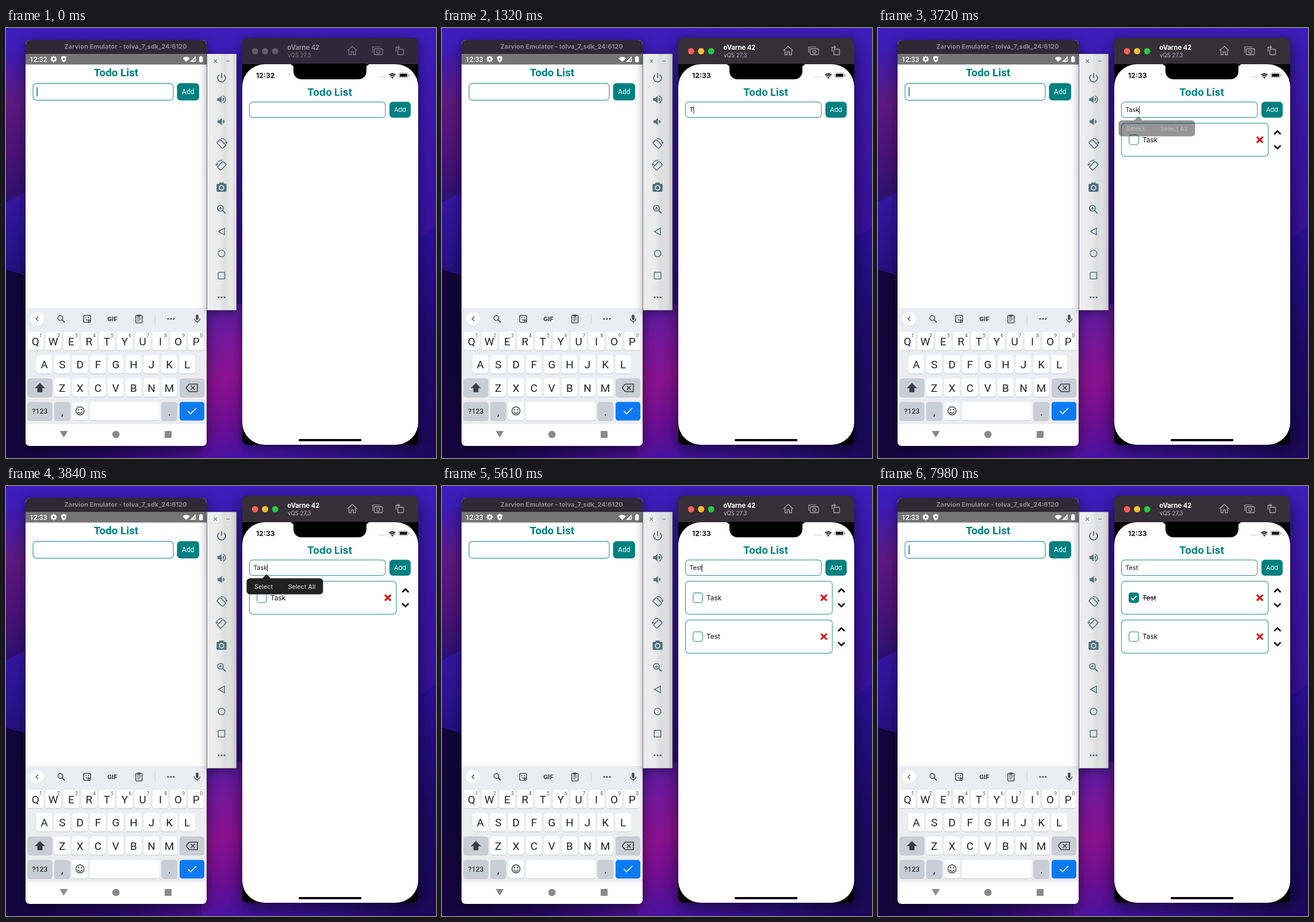
An HTML page with a canvas for the animation above (8000 ms loop, 748 by 748 pixels).

```html
<!DOCTYPE html>
<html lang="en">
<head>
<meta charset="utf-8">
<title>Todo list on two devices</title>
<style>
html, body { margin: 0; width: 100%; height: 100%; overflow: hidden; background: #2a0f80; }
canvas { display: block; width: 748px; height: 748px; }
</style>
</head>
<body>
<canvas id="stage" width="748" height="748"></canvas>
<script>
const ctx = document.getElementById('stage').getContext('2d');
const LOOP = 8000;
const TEAL = '#008080', SLATE = '#4f7480', KEY_INK = '#202124', ICON = '#4a4d51', MODIFIER = '#c9ced6';
const ROBOTO = 'Roboto, sans-serif', INTER = 'Inter, sans-serif';

// times at which the left caret flips, starting visible
const BLINKS = [180, 660, 1080, 1560, 2010, 2460, 2910, 3360, 3810, 4290,
  4710, 5160, 5610, 6090, 6540, 6990, 7440, 7890];
const TYPED = [[0, ''], [1320, 'T'], [1440, 'Ta'], [1560, 'Tas'], [1650, 'Task'],
  [3870, 'Tas'], [3930, 'Ta'], [4020, 'T'], [4170, 'Te'], [4290, 'Tes'], [4440, 'Test']];
const PRESSES = [2430, 4920];
const FOCUS = 690, SWAP = 6150, CHECK = 7350;

const clamp = v => Math.max(0, Math.min(1, v));
const ramp = (t, a, b) => clamp((t - a) / (b - a));

function box(x, y, w, h, r, fill, stroke, lw = 1) {
  ctx.beginPath();
  ctx.roundRect(x, y, w, h, r);
  if (fill) { ctx.fillStyle = fill; ctx.fill(); }
  if (stroke) { ctx.strokeStyle = stroke; ctx.lineWidth = lw; ctx.stroke(); }
}

function trace(p) {
  ctx.beginPath();
  for (let i = 0; i < p.length; i += 2) ctx.lineTo(p[i], p[i + 1]);
}

function line(p, color, lw = 1.5, closed = false) {
  trace(p);
  if (closed) ctx.closePath();
  ctx.strokeStyle = color;
  ctx.lineWidth = lw;
  ctx.stroke();
}

function poly(p, fill) {
  trace(p);
  ctx.fillStyle = fill;
  ctx.fill();
}

function dot(x, y, r, fill) {
  ctx.beginPath();
  ctx.arc(x, y, r, 0, 7);
  ctx.fillStyle = fill;
  ctx.fill();
}

function arc(x, y, r, color, lw = 1.5, a = 0, b = Math.PI * 2) {
  ctx.beginPath();
  ctx.arc(x, y, r, a, b);
  ctx.strokeStyle = color;
  ctx.lineWidth = lw;
  ctx.stroke();
}

function text(s, x, y, font, color, align = 'left') {
  ctx.font = font;
  ctx.fillStyle = color;
  ctx.textAlign = align;
  ctx.fillText(s, x, y);
}

function at(x, y, draw, angle = 0) {
  ctx.save();
  ctx.translate(x, y);
  ctx.rotate(angle);
  draw();
  ctx.restore();
}

function shade(x0, y0, x1, y1, ...colors) {
  const g = ctx.createLinearGradient(x0, y0, x1, y1);
  colors.forEach((c, i) => g.addColorStop(i / (colors.length - 1), c));
  return g;
}

function shadowBox(x, y, w, h, r, fill, blur, alpha) {
  ctx.save();
  ctx.shadowColor = `rgba(0,0,0,${alpha})`;
  ctx.shadowBlur = blur;
  ctx.shadowOffsetY = blur / 4;
  box(x, y, w, h, r, fill);
  ctx.restore();
}

function wallpaper() {
  box(0, 0, 748, 748, 0, shade(0, 0, 0, 748, '#3d1dbc', '#3a15a6', '#36109a', '#2c0c82', '#2b0c78'));
  poly([0, 45, 90, 20, 90, 270, 0, 305], shade(0, 40, 0, 300, '#3d1bb2', '#5c187f', '#4c1278', '#2c1070'));
  poly([0, 303, 120, 240, 120, 450, 0, 420], shade(0, 270, 0, 420, '#3717a8', '#241080'));
  poly([0, 420, 110, 452, 360, 600, 360, 748, 0, 748], shade(0, 700, 360, 748, '#12053a', '#220860', '#4c1092'));
  poly([748, 345, 690, 385, 690, 748, 748, 748], shade(0, 350, 0, 748, '#2b0f98', '#1b0a68', '#1a0858'));
  box(340, 480, 80, 268, 0, shade(340, 480, 410, 748, '#4e1ba0', '#74179a', '#8a1190', '#6c0e92', '#4512a2'));
  box(411, 720, 337, 28, 0, shade(411, 0, 748, 0, '#4512a2', '#2f1084', '#1a0858'));
}

function wifi(x, y, r, color, bands) {
  const a = -Math.PI * .75, b = -Math.PI * .25;
  if (bands) {
    arc(x, y, r - 1, color, 1.9, a, b);
    arc(x, y, r - 4, color, 1.8, a, b);
    dot(x, y - 1, 1.4, color);
  } else {
    ctx.beginPath();
    ctx.moveTo(x, y);
    ctx.arc(x, y, r, a, b);
    ctx.fillStyle = color;
    ctx.fill();
  }
}

function leftStatus(clock) {
  box(34, 45, 315, 18.5, 0, '#757575');
  text(clock, 41, 59, '500 12px ' + ROBOTO, '#fff');
  at(83, 54, () => {
    for (let i = 0; i < 8; i++) {
      ctx.rotate(Math.PI / 4);
      box(-1.2, -5.4, 2.4, 3, .5, '#fff');
    }
    arc(0, 0, 2.9, '#fff', 2);
  });
  poly([100.5, 48.5, 105, 50.3, 105, 54, 103.5, 57.5, 100.5, 60, 97.5, 57.5, 96, 54, 96, 50.3], '#fff');
  poly([99.3, 51.8, 103, 54, 99.3, 56.2], '#757575');
  wifi(313.5, 59, 9, '#fff');
  poly([320, 59, 330, 59, 330, 49], '#fff');
  poly([326.5, 54.5, 328.6, 52.4, 328.6, 57.6, 326.5, 57.6], '#8d8d8d');
  box(336, 50, 6.5, 9.5, 1, '#fff');
  box(337.7, 48.8, 3, 2, 0, '#fff');
}

function key(x, y, w, label, fill = '#fff') {
  box(x, y + 1, w, 32, 4.5, 'rgba(60,66,75,.24)');
  box(x, y, w, 32, 4.5, fill);
  if (label) text(label, x + w / 2, y + 23, '19px ' + ROBOTO, KEY_INK, 'center');
}

function keyTools() {
  const y = 506;
  dot(54, 506.5, 12, '#d9dce0');
  dot(54, 505.7, 12, '#fff');
  line([56, 502, 52.2, 505.7, 56, 509.5], ICON, 1.5);
  arc(94.5, 504.5, 4.2, ICON, 1.6);
  line([97.6, 507.6, 102.3, 512.2], ICON, 1.9);
  box(135, 500, 12, 12, 2, null, ICON, 1.5);
  poly([142.5, 512.6, 147.6, 507.5, 142.5, 507.5], ICON);
  dot(138.7, 503.8, 1, ICON);
  dot(143.3, 503.8, 1, ICON);
  arc(141, 505.3, 2.8, ICON, 1.2, .3, 2.6);
  text('GIF', 185, 510, '900 11.5px ' + ROBOTO, ICON, 'center');
  box(225.7, 500, 11, 13, 1, null, ICON, 1.5);
  box(228.3, 498.5, 5.8, 4, 1, ICON);
  for (const d of [0, 2.6, 5.2]) line([228, 504.4 + d, d > 5 ? 232 : 234.5, 504.4 + d], ICON, 1.1);
  line([259.5, 497, 259.5, 515], '#d0d3d7', 1);
  for (const d of [-5, 0, 5]) dot(287 + d, y, 1.6, ICON);
  box(330.2, 498.5, 4.6, 9.5, 2.3, ICON);
  arc(332.5, 505.5, 4.9, ICON, 1.4, 0, Math.PI);
  line([332.5, 510, 332.5, 513.5], ICON, 1.5);
}

function keyboard() {
  box(34, 487, 315, 202, 0, '#ebedf0');
  keyTools();
  [...'QWERTYUIOP'].forEach((c, i) => {
    const x = 37.5 + i * 31.05;
    key(x, 528.5, 27.5, c);
    text((i + 1) % 10, x + 23, 537.5, '8.5px ' + ROBOTO, '#55585c', 'center');
  });
  [...'ASDFGHJKL'].forEach((c, i) => key(53 + i * 31.05, 569, 27.5, c));
  [...'ZXCVBNM'].forEach((c, i) => key(84 + i * 31.05, 609.5, 27.5, c));
  key(37.5, 609.5, 43, '', MODIFIER);
  poly([59, 617.5, 68, 626.5, 63.4, 626.5, 63.4, 633.5, 54.6, 633.5, 54.6, 626.5, 50, 626.5], '#3a3d41');
  key(302, 609.5, 43, '', MODIFIER);
  line([313.5, 626, 318.5, 619.5, 333, 619.5, 333, 632.5, 318.5, 632.5], '#3a3d41', 1.6, true);
  line([321.5, 622.5, 328.5, 629.5], '#3a3d41', 1.6);
  line([328.5, 622.5, 321.5, 629.5], '#3a3d41', 1.6);
  const y = 650.5;
  key(37.5, y, 43, '', MODIFIER);
  text('?123', 59, 671, '500 12.3px ' + ROBOTO, '#3a3d41', 'center');
  key(84, y, 27.5, ',', MODIFIER);
  key(115, y, 27.5, '');
  arc(128.7, 666, 7, '#3a3d41', 1.5);
  dot(126.2, 664, 1.2, '#3a3d41');
  dot(131.2, 664, 1.2, '#3a3d41');
  arc(128.7, 666.5, 3.7, '#3a3d41', 1.4, .2, 2.94);
  key(146, y, 121.5, '');
  key(270.5, y, 27.5, '.', MODIFIER);
  key(302, y, 43, '', '#0a7af3');
  line([316.5, 666.5, 321, 671, 331, 661], '#fff', 1.6);
}

function addButton(x, y, w, h, font, base, alpha) {
  ctx.globalAlpha = alpha;
  box(x, y, w, h, 6, TEAL);
  text('Add', x + w / 2, base, font, '#fff', 'center');
  ctx.globalAlpha = 1;
}

function leftDevice(t) {
  shadowBox(34, 21, 315, 706, [8, 8, 7, 7], '#fff', 22, .55);
  box(34, 21, 315, 24, [8, 8, 0, 0], '#302834');
  text('Zarvion Emulator - tolva_7_sdk_24:6120', 208, 35.5, '700 11px ' + INTER, '#8d8790', 'center');
  leftStatus(t < 30 ? '12:32' : '12:33');
  text('Todo List', 191.5, 84, '700 18.8px ' + ROBOTO, TEAL, 'center');
  box(47, 96.3, 244, 29.4, 6, '#fff', '#3a9494', 1.2);
  addButton(297.5, 96, 38.5, 30, '12px ' + ROBOTO, 115.3, 1);
  if (BLINKS.filter(b => b <= t).length % 2 === 0) box(53.2, 103, 1.7, 16, 0, '#16807f');
  keyboard();
  poly([93.5, 701, 107.5, 701, 100.5, 712.5], '#8a8a8a');
  dot(191.3, 707, 6.3, '#8a8a8a');
  box(276, 701, 12, 12, 1, '#8a8a8a');
}

function speaker(x, y, loud) {
  poly([x - 7, y - 2.6, x - 3.8, y - 2.6, x + .6, y - 6.6, x + .6, y + 6.6, x - 3.8, y + 2.6, x - 7, y + 2.6], SLATE);
  ctx.beginPath();
  ctx.arc(x + 1.8, y, 3.3, -1.4, 1.4);
  ctx.fillStyle = SLATE;
  ctx.fill();
  if (loud) arc(x + 1, y, 6.6, SLATE, 1.6, -1.25, 1.25);
}

function turn(x, y, dir) {
  at(x, y, () => {
    ctx.scale(dir, 1);
    at(-.5, .8, () => box(-4.2, -7, 8.4, 14, 1, null, SLATE, 1.6), -Math.PI / 4);
    arc(0, 0, 8.8, SLATE, 1.4, -1.7, -.15);
    poly([5.8, -2.4, 10.6, -2.4, 8.9, 1.2], SLATE);
  });
}

function sidePanel() {
  const x = 375;
  shadowBox(349.5, 45, 51.5, 446, 0, '#ececed', 14, .4);
  box(350, 45, 51, 446, 0, shade(350, 0, 401, 0, '#ebecec', '#ededee', '#ebebec', '#dedfe0', '#ebebec', '#e6e6e8'));
  box(349.5, 45, 51.5, 446, 0, null, 'rgba(80,80,90,.5)', .8);
  line([361.5, 54.8, 367, 60.2], '#63747a', 1.1);
  line([367, 54.8, 361.5, 60.2], '#63747a', 1.1);
  line([383, 57.5, 389, 57.5], '#63747a', 1.1);
  arc(x, 87, 6.8, SLATE, 1.9, -.9, Math.PI + .9);
  line([x, 78.5, x, 87], SLATE, 2);
  speaker(x - .5, 124.5, true);
  speaker(x, 163, false);
  turn(x, 201, 1);
  turn(x, 239, -1);
  box(366.3, 271, 17.4, 14, 2, SLATE);
  box(371.2, 268.8, 7.6, 4, 1, SLATE);
  arc(x, 278, 3.9, '#ececed', 1.7);
  arc(373, 313.5, 5, SLATE, 1.7);
  line([376.7, 317.2, 382, 322.5], SLATE, 2);
  line([370.5, 313.5, 375.5, 313.5], SLATE, 1.2);
  line([373, 311, 373, 316], SLATE, 1.2);
  line([369.5, 354, 380, 348.2, 380, 359.8], SLATE, 1.5, true);
  arc(x, 392.3, 5.8, SLATE, 1.5);
  box(369.2, 425, 11.4, 11.4, .5, null, SLATE, 1.5);
  for (const d of [-5.2, 0, 5.2]) dot(x + d, 468.5, 1.7, SLATE);
}

function titleBar(active) {
  const ink = active ? '#aaa5ac' : '#827b86';
  box(411, 17, 306, 47, [9, 9, 0, 0], active ? '#362f37' : '#30283a');
  const lights = active ? ['#ff5f57', '#febc2e', '#28c840'] : ['#625a68', '#625a68', '#625a68'];
  lights.forEach((c, i) => dot(433.3 + i * 17.4, 40.3, 5.5, c));
  text('oVarne 42', 489.5, 38, '700 11.2px ' + INTER, active ? '#fff' : '#938c97');
  text('vQS 27.3', 490, 51, '9.7px ' + INTER, active ? '#bcb7be' : '#827b86');
  line([594, 39.5, 602.3, 32, 610.6, 39.5], ink, 1.3);
  line([596.5, 38.5, 596.5, 46.5, 600.5, 46.5, 600.5, 41.5, 604.1, 41.5, 604.1, 46.5, 608.1, 46.5, 608.1, 38.5], ink, 1.3);
  line([638, 43, 638, 33, 651, 33], ink, 1.2);
  box(640.5, 36, 14.5, 10.5, 1.8, null, ink, 1.3);
  arc(647.7, 41.3, 2.8, ink, 1.2);
  box(681.5, 37, 10, 9.5, 1.3, null, ink, 1.3);
  line([678.5, 41, 678.5, 33.5, 684.5, 33.5], ink, 1.3);
  line([682, 31, 684.8, 33.5, 682, 36], ink, 1.2);
}

function phone(clock) {
  box(411, 63, 306, 662, [0, 0, 9, 9], '#000');
  box(411, 63, 306, 662, 39, '#fff');
  box(500, 62, 127, 27.3, [0, 0, 14, 14], '#000');
  poly([495, 62.8, 505, 62.8, 501, 67.5], '#000');
  poly([632, 62.8, 622, 62.8, 626, 67.5], '#000');
  text(clock, 435, 86.6, '600 12.4px ' + INTER, '#000');
  for (let i = 0; i < 4; i++) dot(649 + i * 3.7, 85.5, 1, '#bcbcbc');
  wifi(672, 87.3, 8.6, '#000', true);
  box(683.5, 78.3, 16, 8, 2.4, null, '#8c8c8c', .9);
  box(685, 79.8, 13, 5, 1.2, '#000');
  box(700.6, 81, 1.3, 2.8, .6, '#8c8c8c');
  box(509, 715, 109.5, 3.8, 1.9, '#000');
}

function item(y, name, done, icons) {
  const mid = y + 28.8;
  box(423.5, y, 255.5, 57.6, 6, '#fff', '#4a9c9c', 1.2);
  box(436.6, mid - 8.4, 16.8, 16.8, 4, done ? TEAL : '#fff', done ? TEAL : '#4a9c9c', 1.3);
  if (done) line([440.5, mid + .4, 443.7, mid + 3.6, 449.8, mid - 3.4], '#fff', 2);
  text(name, 460, mid + 4.4, '11.9px ' + INTER, '#111');
  if (done) line([460, mid + .4, 460 + ctx.measureText(name).width, mid + .4], '#111', 1);
  if (!icons) return;
  line([659, mid - 5, 669.3, mid + 5], '#e00b0b', 3);
  line([669.3, mid - 5, 659, mid + 5], '#e00b0b', 3);
  line([689.2, mid - 9.6, 694.8, mid - 15, 700.4, mid - 9.6], '#000', 2.6);
  line([689.2, mid + 10, 694.8, mid + 15.4, 700.4, mid + 10], '#000', 2.6);
}

function caretAlpha(t) {
  if (t < FOCUS) return 0;
  if (t < 1320) return ramp(t, 840, 930);
  if (t < 2160 || (t >= 3690 && t < 4950)) return 1;
  const p = (t - (t < 3690 ? 2160 : 4950)) % 900;
  return p < 310 ? 1 - ramp(p, 0, 75) : ramp(p, 310, 385);
}

function pressAlpha(t) {
  return PRESSES.reduce((a, p) =>
    t < p || t > p + 270 ? a : 1 - .65 * Math.min(ramp(t, p - 15, p + 60), 1 - ramp(t, p + 90, p + 270)), 1);
}

function menu(t) {
  const a = ramp(t, 3690, 3756) * (1 - ramp(t, 3840, 3930));
  if (!a) return;
  ctx.globalAlpha = a;
  ctx.beginPath();
  ctx.roundRect(418.5, 160.5, 133, 28, 6);
  ctx.moveTo(446, 160.5);
  ctx.lineTo(460, 160.5);
  ctx.lineTo(453, 153.5);
  ctx.closePath();
  ctx.fillStyle = '#1f1f1f';
  // nonzero winding unites body and pointer only when they do not overlap
  ctx.fill();
  text('Select', 448, 178.5, '10.8px ' + INTER, '#e8e8e8', 'center');
  text('Select All', 514.5, 178.5, '10.8px ' + INTER, '#e8e8e8', 'center');
  ctx.globalAlpha = 1;
}

function rightDevice(t) {
  const active = t >= FOCUS;
  shadowBox(411, 17, 306, 708, 9, '#000', active ? 30 : 20, active ? .62 : .5);
  titleBar(active);
  phone(t < 330 ? '12:32' : '12:33');
  text('Todo List', 563, 117.8, '700 17.6px ' + INTER, TEAL, 'center');
  box(423.5, 128.6, 236.5, 27, 6, '#fff', '#4a9c9c', 1.2);
  addButton(667, 128.2, 37, 27.8, '11px ' + INTER, 146, pressAlpha(t));

  const typed = TYPED.filter(k => k[0] <= t).pop()[1];
  text(typed, 430.5, 146, '10.7px ' + INTER, '#111');
  const end = 430.5 + ctx.measureText(typed).width;
  ctx.globalAlpha = caretAlpha(t);
  box(end - .2, 136, 1.3, 13, 0, '#2b4a73');
  ctx.globalAlpha = 1;

  const names = t < SWAP ? ['Task', 'Test'] : ['Test', 'Task'];
  PRESSES.forEach((p, i) => {
    if (t >= p + 120) item(165.6 + i * 67.6, names[i], i === 0 && t >= CHECK, t >= p + 180);
  });
  menu(t);
}

function draw(now) {
  const t = now % LOOP;
  wallpaper();
  leftDevice(t);
  sidePanel();
  rightDevice(t);
  requestAnimationFrame(draw);
}
requestAnimationFrame(draw);
</script>
</body>
</html>
```
